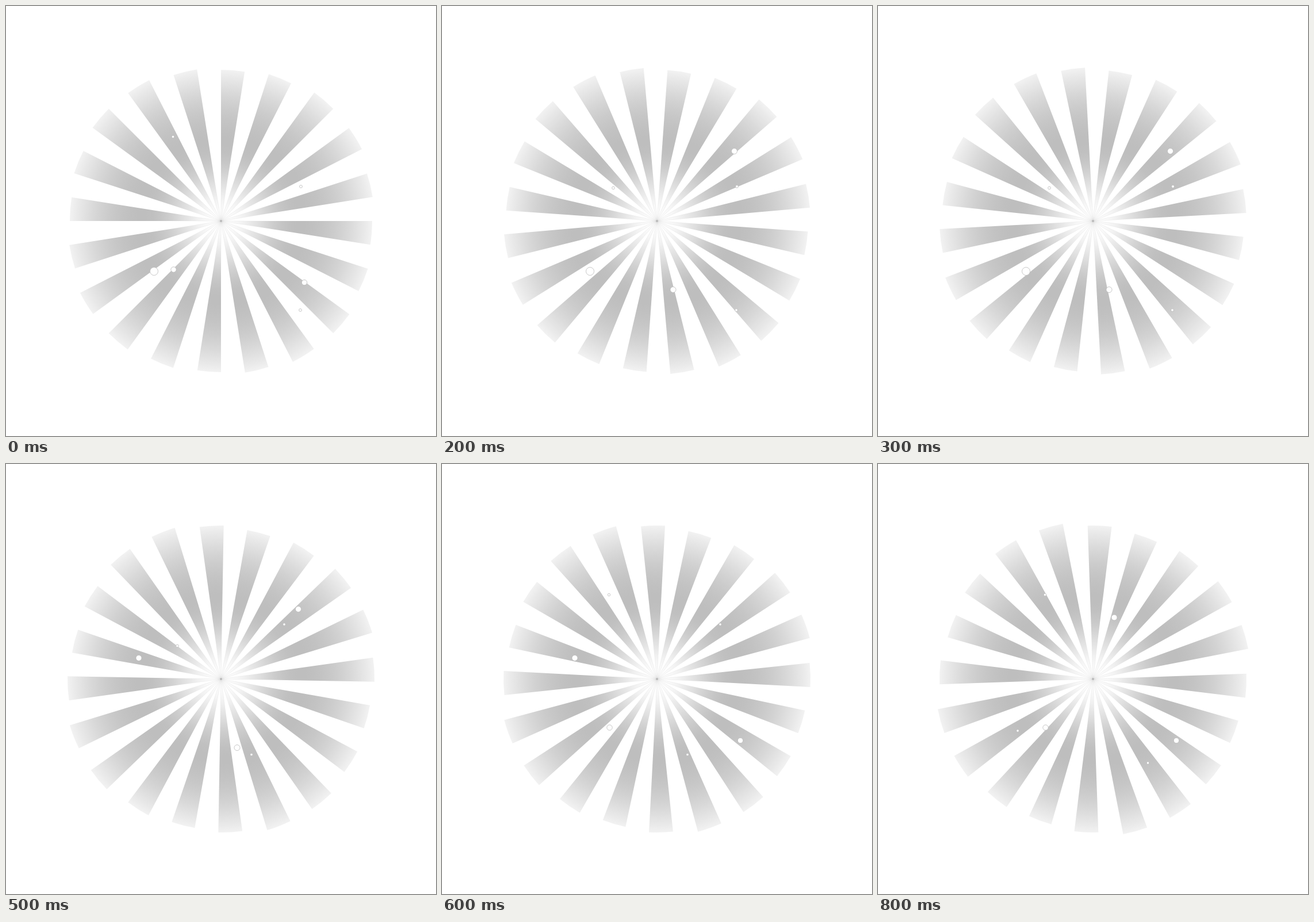
An HTML page with a canvas that plays this animation: 748 by 748 pixels, repeating every 900 ms.

```html
<!DOCTYPE html>
<html lang="en">
<head>
<meta charset="utf-8">
<title>Sunburst</title>
<style>
  html, body { margin: 0; width: 100%; height: 100%; overflow: hidden; background: #fff; }
  canvas { display: block; width: 748px; height: 748px; }
</style>
</head>
<body>
<canvas id="stage" width="748" height="748"></canvas>
<script>
const ctx = document.getElementById("stage").getContext("2d");
const SIZE = 748;
const STEP_MS = 100;
const STEPS = 9;
const TURN_PER_STEP = 2;
const RAYS = 20;
const PITCH = 360 / RAYS;
const SPARKLE_STEPS = 4;
const rad = deg => deg * Math.PI / 180;
const clamp = v => Math.min(1, Math.max(0, v));
const smooth = v => v * v * (3 - 2 * v);

// Rays are longest near the diagonals.
const rayLength = i => 270 + 7 * Math.cos(rad(4 * PITCH * (i - 2.4)));

// Darkness along a ray: eases in from the centre, thins out at the tip.
function darkness(p) {
  const rise = smooth(clamp(p / 0.5));
  const fall = 1 - 0.8 * clamp((p - 0.55) / 0.45) ** 1.6;
  return rise * fall;
}

function rayFill(length) {
  const g = ctx.createRadialGradient(0, 0, 0, 0, 0, length);
  for (let p = 0; p <= 20; p++) {
    const v = Math.round(255 - 65 * darkness(p / 20));
    g.addColorStop(p / 20, `rgb(${v},${v},${v})`);
  }
  return g;
}

const rays = Array.from({ length: RAYS }, (_, i) => {
  const length = rayLength(i);
  return { angle: i * PITCH - 90, length, fill: rayFill(length) };
});

const edgeFade = ctx.createRadialGradient(0, 0, 0, 0, 0, 90);
edgeFade.addColorStop(0, "rgba(170,170,170,.35)");
edgeFade.addColorStop(1, "rgba(190,190,190,0)");

// Two overlapping series of sparkles; dots are [x, y, radius].
const series = [
  { shift: 0, bursts: [
    [[257.5, 461.5, 7], [513, 314, 2.4], [512, 529, 2.4]],
    [[231, 337.5, 5], [484, 279, 2.2], [427, 505.5, 2.2]],
    [[411, 267, 5], [243, 464, 2.2], [469.5, 520, 2.2]]
  ] },
  { shift: 2, bursts: [
    [[291.5, 458.5, 4.7], [519, 481, 4.7], [290.5, 227.5, 2.2]],
    [[508.5, 252.5, 5], [402, 493.5, 5], [298, 316.5, 2.4]]
  ] }
];

function circle(x, y, r, fill) {
  ctx.beginPath();
  ctx.arc(x, y, r, 0, 2 * Math.PI);
  ctx.fillStyle = fill;
  ctx.fill();
}

function drawRay({ angle, length, fill }, turn) {
  const from = rad(angle + turn);
  const to = from + rad(PITCH / 2);
  ctx.beginPath();
  ctx.moveTo(0, 0);
  ctx.arc(0, 0, length, from, to);
  ctx.fillStyle = fill;
  ctx.fill();

  ctx.beginPath();
  for (const edge of [from, to]) {
    ctx.moveTo(0, 0);
    ctx.lineTo(90 * Math.cos(edge), 90 * Math.sin(edge));
  }
  ctx.strokeStyle = edgeFade;
  ctx.lineWidth = 0.6;
  ctx.stroke();
}

function drawSparkle([x, y, r]) {
  circle(x, y, r, "#fff");
  ctx.strokeStyle = "#b9b9b9";
  ctx.lineWidth = 0.8;
  ctx.stroke();
}

function draw(step) {
  ctx.fillStyle = "#fff";
  ctx.fillRect(0, 0, SIZE, SIZE);

  ctx.save();
  ctx.translate(SIZE / 2, SIZE / 2);
  for (const ray of rays) drawRay(ray, step * TURN_PER_STEP);
  circle(0, 0, 1.8, "rgba(165,165,165,.5)");
  ctx.restore();

  for (const { shift, bursts } of series) {
    const turn = Math.floor((step + shift) / SPARKLE_STEPS);
    bursts[turn % bursts.length].forEach(drawSparkle);
  }
}

const start = performance.now();
function tick() {
  draw(Math.floor((performance.now() - start) / STEP_MS) % STEPS);
  requestAnimationFrame(tick);
}
tick();
</script>
</body>
</html>
```
